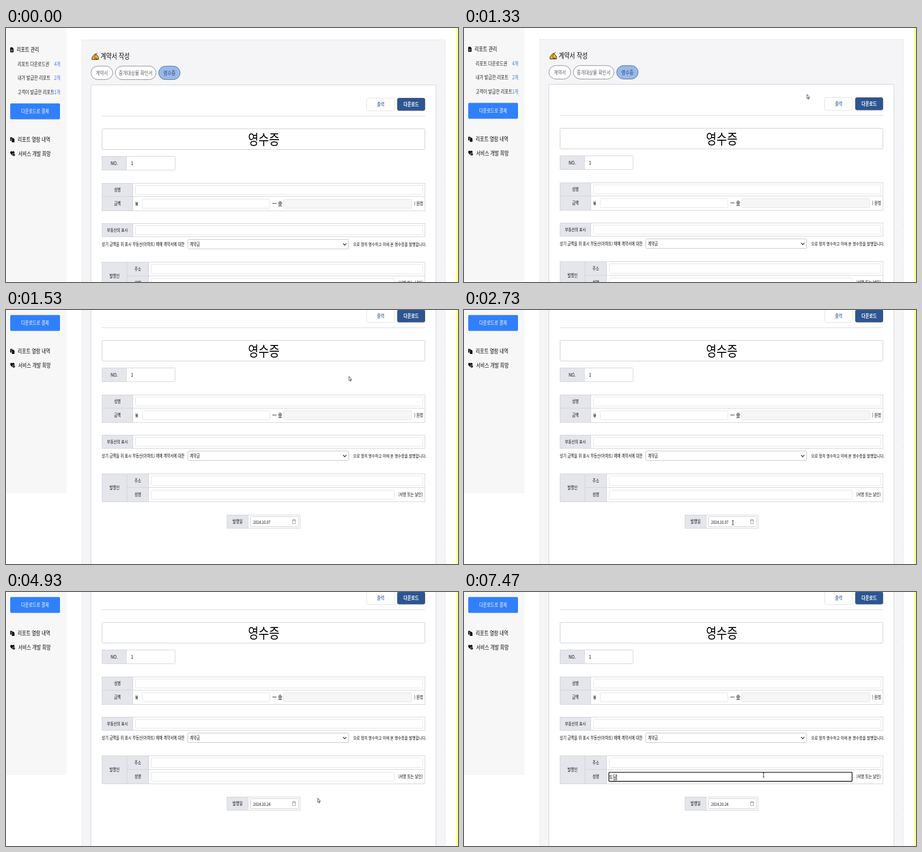
Animation of 854x480 px, one loop 8 s. Source, as an HTML page:

```html
<!DOCTYPE html>
<html lang="ko">
<head>
<meta charset="utf-8">
<title>영수증 작성</title>
<style>
html, body { margin: 0; width: 100%; height: 100%; overflow: hidden; background: #fff; }
svg { display: block; width: 854px; height: 480px; }
text { font-family: "Noto Sans CJK KR", "Noto Sans CJK", "Noto Sans", sans-serif; }
.latin text { font-family: Inter, Roboto, sans-serif; }
</style>
</head>
<body>
<svg id="stage" viewBox="0 0 854 480"></svg>
<script>
const LOOP = 8000, FPS = 15, SQUEEZE = 0.8, SCROLLED = 133;
const LINE = '#d2d4da', SOFT = '#e3e4e8', LABEL = '#e5e6ec', INK = '#0c0c0e', BLUE = '#2c5591';
const stage = document.getElementById('stage');

function add(parent, tag, attrs) {
  const el = document.createElementNS('http://www.w3.org/2000/svg', tag);
  for (const k in attrs) el.setAttribute(k, attrs[k]);
  return parent.appendChild(el);
}
const group = (parent, attrs) => add(parent, 'g', attrs);
const path = (parent, d, attrs) => add(parent, 'path', { d, ...attrs });

// Box given by its outer edges, with a 1px border inside.
function box(parent, x1, y1, x2, y2, fill, stroke, rx = 0, extra) {
  const e = stroke ? 0.5 : 0;
  return add(parent, 'rect', {
    x: x1 + e, y: y1 + e, width: x2 - x1 - 2 * e, height: y2 - y1 - 2 * e,
    fill: fill || 'none', stroke: stroke || 'none', rx, ...extra
  });
}

// Text centred vertically on y; all type shares one horizontal squeeze.
function text(parent, x, y, str, size, { weight = 400, fill = INK, anchor = 'start' } = {}) {
  const el = add(parent, 'text', {
    transform: `translate(${x} ${y + size * 0.37}) scale(${SQUEEZE} 1)`,
    'font-size': size, 'font-weight': weight, fill, 'text-anchor': anchor
  });
  el.textContent = str;
  return el;
}
const mid = (parent, x, y, str, size, weight = 500, fill = INK) =>
  text(parent, x, y, str, size, { weight, fill, anchor: 'middle' });

const page = group(stage);

// Sidebar
box(page, 0, -10, 114, 479, '#f7f7f8');
path(page, 'M8 37.5q0-1 1-1h3l2.3 2.5v6q0 1-1 1h-4.3q-1 0-1-1z', { fill: '#111' });
path(page, 'M9.6 41.5h3M9.6 43.5h3', { stroke: '#f7f7f8', 'stroke-width': 0.8 });
text(page, 20, 41, '리포트 관리', 10.9, { weight: 500 });
[['리포트 다운로드권', '4개', 68.5], ['내가 발급한 리포트', '2개', 94.5], ['고객이 발급한 리포트', '1개', 121]]
  .forEach(([label, count, y]) => {
    text(page, 22, y, label, 9.8, { fill: '#222' });
    text(page, 102.5, y, count, 9.8, { fill: '#3a77dc', anchor: 'end', weight: 500 });
  });
box(page, 8, 142.5, 102, 172.5, '#3180fb', null, 2);
mid(page, 55, 157.5, '다운로드로 결제', 9.75, 500, '#fff');
path(page, 'M8 206.5h4v7h-4zM11 208h3l2 2v6h-5z', { fill: '#111' });
path(page, 'M10.7 207.8v6.2', { stroke: '#f7f7f8', 'stroke-width': 0.7 });
text(page, 22, 211, '리포트 열람 내역', 11, { weight: 500 });
path(page, 'M12 241q-4-3-4-5.700q0-2.500 2-2.500q1.300 0 2 1.300q.8-1.300 2-1.300q2.200 0 2.200 2.500q0 2.700-4.200 5.700z', { fill: '#111' });
add(page, 'circle', { cx: 14.6, cy: 239.6, r: 2.7, fill: '#111', stroke: '#f7f7f8', 'stroke-width': 0.7 });
path(page, 'M13.500 239.600l.8.800 1.400-1.600', { stroke: '#fff', 'stroke-width': 0.6, fill: 'none' });
text(page, 23, 237.5, '서비스 개발 희망', 11, { weight: 500 });

// Main panel and heading
box(page, 143, 22, 830.5, 900, '#f5f5f8', '#dcdde2', 0, { 'stroke-dasharray': '3 2' });
path(page, 'M162.500 59.500v-4l5-6q1.500-1.500 2.500 0l4 4.500q1 1.500 .8 5.500z', { fill: '#fbb52c', stroke: '#2a1a08', 'stroke-width': 1 });
path(page, 'M166 56l6.500-9.500M167 57.500l4-1M169 59l4-1', { fill: 'none', stroke: '#3b2412', 'stroke-width': 0.9 });
text(page, 179, 52.5, '계약서 작성', 14, { weight: 500 });
[[160, 202, '계약서'], [206, 284, '중개대상물 확인서'], [288, 329.5, '영수증']].forEach(([a, b, label], i) => {
  const on = i === 2;
  box(page, a, 71.500, b, 98, on ? '#9ab8e8' : '#fff', on ? '#4a6ea8' : '#85868b', 13);
  mid(page, (a + b) / 2, 85, label, 10.5, on ? 500 : 400, on ? '#274b86' : '#606166');
});

// Card
box(page, 160, 107, 813, 900, '#fff', '#cfd0d5', 1);
box(page, 681, 132, 735, 157, '#fff', '#dde1e8', 3);
mid(page, 708, 144.5, '출력', 9.7, 500, BLUE);
box(page, 739, 132, 792, 156.5, BLUE, '#5b6270', 3);
mid(page, 765.5, 144.5, '다운로드', 9.8, 700, '#fff');
box(page, 181, 166, 792, 167, '#d9dadd');
box(page, 181, 190, 792, 230, '#fff', '#cccdd2', 2);
mid(page, 487, 211.5, '영수증', 27, 500, '#000');

const inputs = [];
function input(x1, y1, x2, y2, fill = '#fff', stroke = SOFT) {
  inputs.push([x1, y1, x2, y2]);
  return box(page, x1, y1, x2, y2, fill, stroke, 1);
}
function label(x1, y1, x2, y2, str, size = 8.6) {
  box(page, x1, y1, x2, y2, LABEL, LINE);
  mid(page, (x1 + x2) / 2, (y1 + y2) / 2, str, size);
}

// Form
input(181, 242, 320, 269, '#fff', LINE);
label(181, 242, 228, 269, 'NO.', 9.6);
text(page, 236, 255.5, '1', 9.6);

box(page, 181, 293, 792, 346, '#fff', LINE);
box(page, 181, 318, 792, 319, LINE);
label(181, 293, 240, 319, '성명');
label(181, 318, 240, 346, '금액');
input(244, 297, 788, 315);
text(page, 244.5, 332, '₩', 10.5, { weight: 500 });
input(257, 323, 499, 341);
text(page, 503, 332, '一 金', 10.5, { weight: 500 });
input(524, 323, 767, 341, '#f6f6f6');
text(page, 771, 332, ') 원정', 8.8, { weight: 500 });

box(page, 181, 369, 792, 395, '#fff', LINE);
label(181, 369, 240, 395, '부동산의 표시', 8.5);
input(244, 373, 788, 391);
text(page, 181, 408.5, '상기 금액을 위 표시 부동산(아파트) 매매 계약서에 대한', 8.55, { weight: 500 });
box(page, 343, 399, 648, 418, '#fff', '#c4c5ca', 2);
text(page, 347.5, 408.5, '계약금', 8.6, { weight: 500 });
path(page, 'M637 407l3 3.500 3-3.500', { fill: 'none', stroke: '#333', 'stroke-width': 1.2 });
text(page, 656, 408.5, '으로 정히 영수하고 이에 본 영수증을 발행합니다.', 8.5, { weight: 500 });

box(page, 181, 442, 792, 496, '#fff', LINE);
box(page, 181, 468, 792, 469, LINE);
label(181, 442, 229, 496, '발행인');
label(228, 442, 270, 469, '주소');
label(228, 468, 270, 496, '성명');
input(274, 446, 788, 465);
input(274, 473, 734, 491);
text(page, 787.5, 482, '(서명 또는 날인)', 8.6, { weight: 500, anchor: 'end' });

box(page, 417, 520, 556, 546, '#fff', LINE);
label(417, 520, 458, 546, '발행일');
input(461, 523, 553, 543, '#fff', '#cccdd2');
const dateText = text(page, 467, 534, '', 8.2);
path(page, 'M541.500 529.500h5.500v7h-5.500zM541.500 531.500h5.500M543 528v2M545.500 528v2', { fill: 'none', stroke: '#8b8c92', 'stroke-width': 0.8 });

// Focus ring and typed name
const focus = add(page, 'rect', { x: 273.7, y: 473.6, width: 459.6, height: 17.2, rx: 1.5, fill: '#fff', stroke: '#111', 'stroke-width': 1.4 });
const typed = text(page, 274.5, 482.5, '', 9.5);
const compose = path(page, '', { fill: 'none', stroke: '#333', 'stroke-width': 0.8 });

// Calendar
const cal = group(stage, { class: 'latin' });
path(cal, 'M470.500 245.500h116q3 0 3 3v135q0 3-3 3h-77l-4.500 4.500-4.500-4.500h-30q-3 0-3-3v-135q0-3 3-3z', { fill: '#fff', stroke: '#aeaeae' });
path(cal, 'M468 281v-32q0-3 3-3h115q3 0 3 3v32z', { fill: '#f0f0f0' });
box(cal, 468, 280, 589, 281, '#b4b4b4');
path(cal, 'M480 252.500l-3 3.500 3 3.500M577 252.500l3 3.500-3 3.500', { fill: 'none', stroke: '#bcbcbc', 'stroke-width': 1.3 });
mid(cal, 528.5, 256, 'October 2024', 9, 700, '#000');
const colX = c => 479 + 16.5 * c, rowY = r => 295 + 19.4 * r;
['Su', 'Mo', 'Tu', 'We', 'Th', 'Fr', 'Sa'].forEach((d, c) => mid(cal, colX(c), 271, d, 7.4, 600, '#000'));
const hover = box(cal, -7, -8, 7, 8, '#f0f0f0', null, 2);
box(cal, colX(1) - 7, rowY(1) - 8, colX(1) + 7, rowY(1) + 8, '#2264a5', null, 2);
for (let i = 0; i < 35; i++) {
  const n = i < 2 ? 29 + i : (i - 2) % 31 + 1;
  mid(cal, colX(i % 7), rowY(Math.floor(i / 7)), n, 7.4, 600, n === 7 ? '#fff' : '#000');
}

box(stage, 850, 0, 854, 480, '#ffffa0');
box(stage, 852, 0, 854, 480, '#ffff86');

// Pointers, each with its hot spot at 0,0
const pointer = group(stage);
const pointers = {
  arrow: path(pointer, 'M0 .5v8l1.700-1.500 1.200 2.700 1.200-.6-1.200-2.600h2.200z', { fill: '#fff', stroke: '#222', 'stroke-width': 0.8 }),
  beam: path(pointer, 'M-1.500-4h3M0-4v8M-1.500 4h3', { fill: 'none', stroke: '#111', 'stroke-width': 0.9 }),
  hand: path(pointer, 'M-.8 0q.8-1 1.600 0v4l3 .7q1 .4.8 1.800l-.8 4h-4.200l-2.200-3.500q-.2-1.200 1.800 0z', { fill: '#fff', stroke: '#222', 'stroke-width': 0.8 })
};

// [step, x, y] and [step, offset], with 15 steps a second
const moves = [
  [6, 175, 202], [13, 661, 121], [15, 648, 125], [29, 648, 125], [41, 508, 402],
  [48, 508, 402], [61, 544, 356], [69, 544, 356], [72, 588, 396], [74, 589, 389],
  [78, 589, 389], [84, 566, 346]
];
const scrolls = [[18, 0], [20, 1], [21, 27], [22, 92], [23, SCROLLED]];
const typing = [[107, 'ㄷ'], [108, '도'], [109, '돋'], [111, '도다'], [112, '도담']];
const smooth = u => u * u * (3 - 2 * u);

function track(keys, step, ease = u => u) {
  const i = keys.findIndex(k => k[0] > step);
  if (i < 0) return keys[keys.length - 1].slice(1);
  if (i === 0) return keys[0].slice(1);
  const a = keys[i - 1], b = keys[i], u = ease((step - a[0]) / (b[0] - a[0]));
  return a.slice(1).map((v, j) => v + (b[j + 1] - v) * u);
}
const show = (el, on) => el.setAttribute('visibility', on ? 'visible' : 'hidden');

function draw(step) {
  const [offset] = track(scrolls, step);
  const [x, y] = track(moves, step, smooth);
  const open = step >= 47 && step < 64;
  page.setAttribute('transform', `translate(0 ${-offset})`);
  cal.style.display = open ? '' : 'none';
  dateText.textContent = step < 64 ? '2024.10.07' : '2024.10.24';

  const col = Math.round((x - 479) / 16.5), row = Math.round((y - 295) / 19.4);
  const onDay = open && y < 382 && Math.abs(x - colX(col)) < 8 && Math.abs(y - rowY(row)) < 8.5;
  const onInput = inputs.some(([a, b, c, d]) => x > a && x < c && y + offset > b && y + offset < d);
  const kind = onDay ? 'hand' : open && y < 387 ? 'arrow' : onInput ? 'beam' : 'arrow';
  hover.setAttribute('transform', `translate(${colX(col)} ${rowY(row)})`);
  hover.style.display = onDay ? '' : 'none';
  pointer.setAttribute('transform', `translate(${x} ${y})`);
  pointer.style.display = step < 6 ? 'none' : '';
  for (const k in pointers) show(pointers[k], k === kind);

  show(focus, step >= 89);
  const name = typing.reduce((s, [at, str]) => step >= at ? str : s, '');
  typed.textContent = name;
  const end = 274.5 + 7 * name.length;
  compose.setAttribute('d', name ? `M${end - 6.7} 488.500h6.700v-11` : '');
}

function tick() {
  const t = performance.now() % LOOP;
  draw(Math.floor((t + 4) * FPS / 1000) % (LOOP * FPS / 1000));
  requestAnimationFrame(tick);
}
tick();
</script>
</body>
</html>
```
